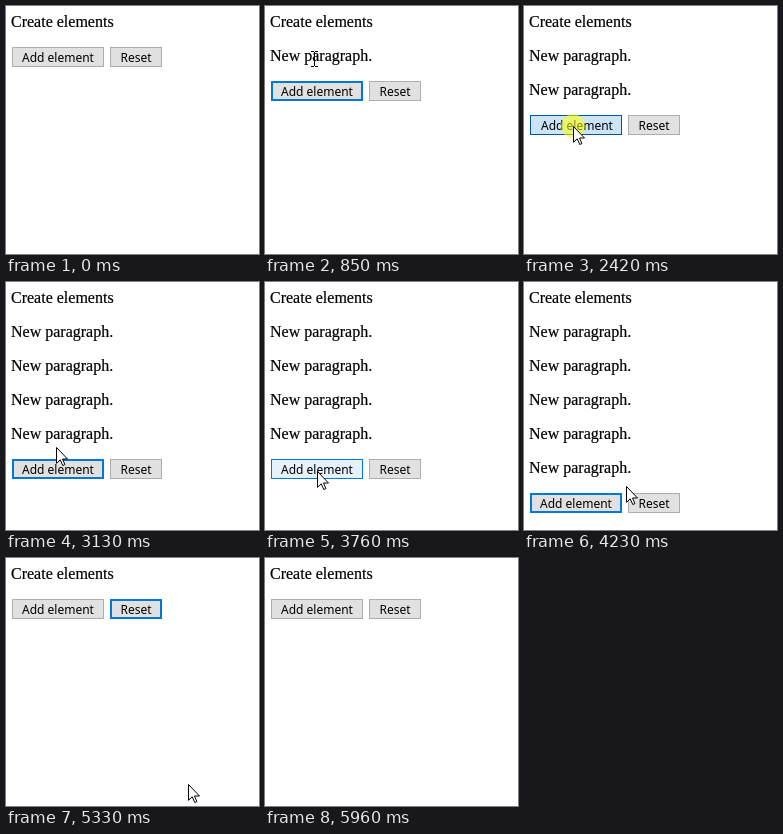
Recreate the animation shown at these times as an HTML page. Size 253 px wide and 248 px high, loop 6.04 s.

```html
<!DOCTYPE html>
<html lang="en">
<head>
<meta charset="utf-8">
<title>Create elements</title>
<style>
  html, body { margin: 0; width: 100%; height: 100%; overflow: hidden; background: #fff; }
  svg { display: block; }
  .copy { font: 16px "Liberation Serif", "Times New Roman", serif; stroke: #000; stroke-width: .2; }
  .btn text { font: 12px "Noto Sans", "Open Sans", sans-serif; text-anchor: middle; }
  .btn rect { fill: #e1e1e1; stroke: #adadad; }
  .btn .ring { fill: none; stroke: #0078d7; visibility: hidden; }
  .btn.focus rect { stroke: #0078d7; }
  .btn.focus .ring { visibility: visible; }
  .btn.hover rect { fill: #e5f1fb; stroke: #0078d7; }
  .btn.active rect { fill: #cce4f7; stroke: #005499; }
  .btn.hover .ring, .btn.active .ring { fill: none; }
  .btn.active text { transform: translate(1px, 0); }
  #glow { fill: rgba(255, 255, 0, .55); }
  #arrow { fill: #fff; stroke: #000; }
  #beam { shape-rendering: crispEdges; }
</style>
</head>
<body>
<svg width="253" height="248" viewBox="0 0 253 248">
  <g class="copy">
    <text x="5" y="21">Create elements</text>
    <g id="paras"></g>
  </g>
  <g id="row">
    <g class="btn" id="add">
      <rect x="6.5" y=".5" width="91" height="19"/>
      <rect class="ring" x="7.5" y="1.5" width="89" height="17"/>
      <text x="52" y="15">Add element</text>
    </g>
    <g class="btn" id="reset">
      <rect x="104.5" y=".5" width="51" height="19"/>
      <rect class="ring" x="105.5" y="1.5" width="49" height="17"/>
      <text x="130" y="15">Reset</text>
    </g>
  </g>
  <g id="pointer">
    <circle id="glow" r="12"/>
    <path id="arrow" d="M.5.5V16.3L4.2 12.8 6.8 18.5 8.9 17.6 6.5 12H11.5Z"/>
    <path id="beam" d="M-3-8h3v1h-3zM1-8h3v1h-3zM0-7h1v14h-1zM-3 7h3v1h-3zM1 7h3v1h-3z"/>
  </g>
</svg>
<script>
const LOOP = 6040, TICK = 78.5, START = 70;
const TOP = 41, GAP = 34, LINE = 18, HEIGHT = 20;
const BLUR = 76;

// Where the pointer rests, in ticks; it glides from one stop to the next
const stops = [
  { arrive: 1, x: 219, y: 236 },
  { arrive: 8, press: 9, leave: 17, x: 49, y: 53 },
  { arrive: 21, press: 23, x: 41, y: 84 },
  { arrive: 29, press: 31, x: 49, y: 120 },
  { arrive: 36, press: 38, x: 50, y: 161 },
  { arrive: 46, press: 49, x: 52, y: 189 },
  { arrive: 59, press: 63, x: 137, y: 223 },
  { arrive: 70, x: 193, y: 228 },
  { arrive: 72, x: 209, y: 244 }
];
const presses = stops.map(s => s.press).filter(Boolean);
const firstPress = presses[0], resetPress = presses[presses.length - 1];

const $ = id => document.getElementById(id);
const show = (el, on) => { el.style.display = on ? "" : "none"; };
const mix = (a, b, f) => Math.round(a + (b - a) * f);

const paras = presses.slice(1).map((_, i) => {
  const p = document.createElementNS("http://www.w3.org/2000/svg", "text");
  p.setAttribute("x", 5);
  p.setAttribute("y", 55 + GAP * i);
  p.textContent = "New paragraph.";
  $("paras").append(p);
  return p;
});

function pointerAt(k) {
  const i = stops.findIndex(s => s.arrive >= k);
  if (k < 1 || i < 0) return null;
  const to = stops[i], from = stops[i - 1] || to;
  if (k === to.arrive) return to;
  const leave = from.leave || (from.press ? from.press + 1 : from.arrive);
  const f = Math.max(0, (k - leave) / (to.arrive - leave));
  return { x: mix(from.x, to.x, 1 - (1 - f) ** 1.5), y: mix(from.y, to.y, f) };
}

function draw(k) {
  const pos = pointerAt(k);
  const pressed = presses.includes(k);
  const count = k > resetPress ? 0 : presses.filter(p => p < k).length;
  const top = TOP + GAP * count;
  const focus = k >= BLUR || k < firstPress ? "" : k >= resetPress ? "reset" : "add";

  paras.forEach((p, i) => show(p, i < count));
  $("row").setAttribute("transform", `translate(0 ${top})`);

  const inRow = pos && pos.y >= top && pos.y < top + HEIGHT;
  const setState = (id, left, right) => {
    const over = inRow && pos.x >= left && pos.x < right;
    const state = over ? (pressed ? "active" : "hover") : focus === id ? "focus" : "";
    $(id).setAttribute("class", "btn " + state);
  };
  setState("add", 6, 98);
  setState("reset", 104, 156);

  show($("pointer"), pos);
  if (!pos) return;
  const depth = pos.y - TOP;
  const onText = depth >= 0 && depth < GAP * count && depth % GAP < LINE &&
    pos.x < 107 && !presses.includes(k - 1);
  $("pointer").setAttribute("transform", `translate(${pos.x} ${pos.y})`);
  show($("glow"), pressed);
  show($("arrow"), !onText);
  show($("beam"), onText);
}

let last = -1;
const begin = performance.now();
function frame() {
  const t = (performance.now() - begin) % LOOP;
  const k = t < START ? 0 : Math.floor((t - START) / TICK + 1.08);
  if (k !== last) draw(last = k);
  requestAnimationFrame(frame);
}
frame();
</script>
</body>
</html>
```
